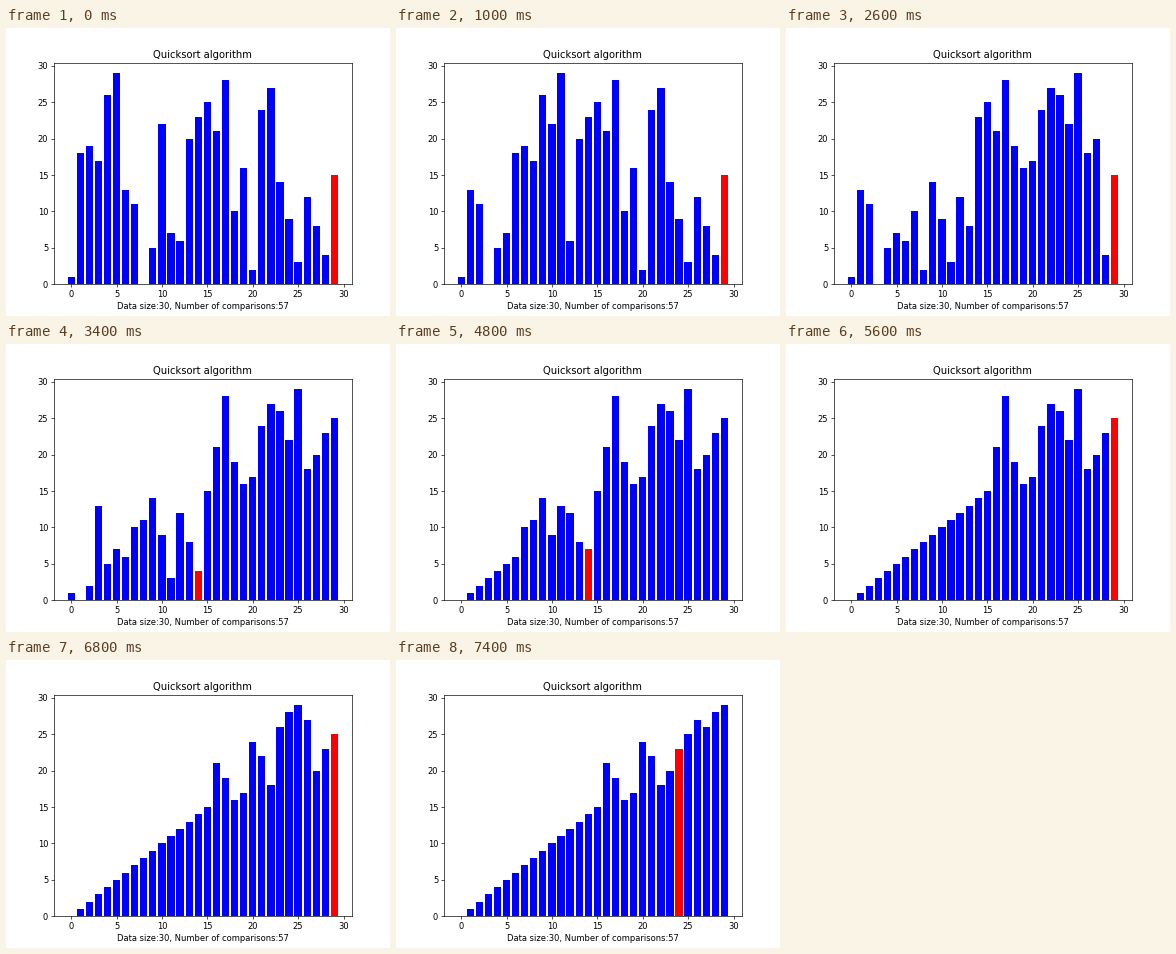
Animation of 384 by 288 pixels, one loop 8000 ms. Source, as a matplotlib script:

```python
from itertools import islice

import matplotlib.pyplot as plt
from matplotlib.animation import FuncAnimation

STEP_MS = 200
STEPS = 40
COMPARISONS = 57

# The unsorted input; every later state follows from the algorithm.
START = [1, 18, 19, 17, 26, 29, 13, 11, 0, 5, 22, 7, 6, 20, 23,
         25, 21, 28, 10, 16, 2, 24, 27, 14, 9, 3, 12, 8, 4, 15]


def quicksort(data, low, high):
    """Sort in place, yielding (values, pivot index) after every swap."""
    if low >= high:
        return
    pivot, slot = data[high], low
    for j in range(low, high):
        if data[j] < pivot:
            data[slot], data[j] = data[j], data[slot]
            slot += 1
            yield data[:], high
    data[slot], data[high] = data[high], data[slot]
    yield from quicksort(data, low, slot - 1)
    yield from quicksort(data, slot + 1, high)


states = list(islice(quicksort(START[:], 0, len(START) - 1), STEPS))

fig, ax = plt.subplots(figsize=(6.4, 4.8), dpi=60)
bars = ax.bar(range(len(START)), START, color="blue")
ax.set_title("Quicksort algorithm")
ax.set_xlabel(f"Data size:{len(START)}, Number of comparisons:{COMPARISONS}")


def draw(step):
    values, pivot = states[step]
    for i, (bar, value) in enumerate(zip(bars, values)):
        bar.set_height(value)
        bar.set_facecolor("red" if i == pivot else "blue")
    return bars.patches


anim = FuncAnimation(fig, draw, frames=STEPS, interval=STEP_MS,
                     init_func=lambda: draw(0), repeat=True, repeat_delay=0)
plt.show()
```
